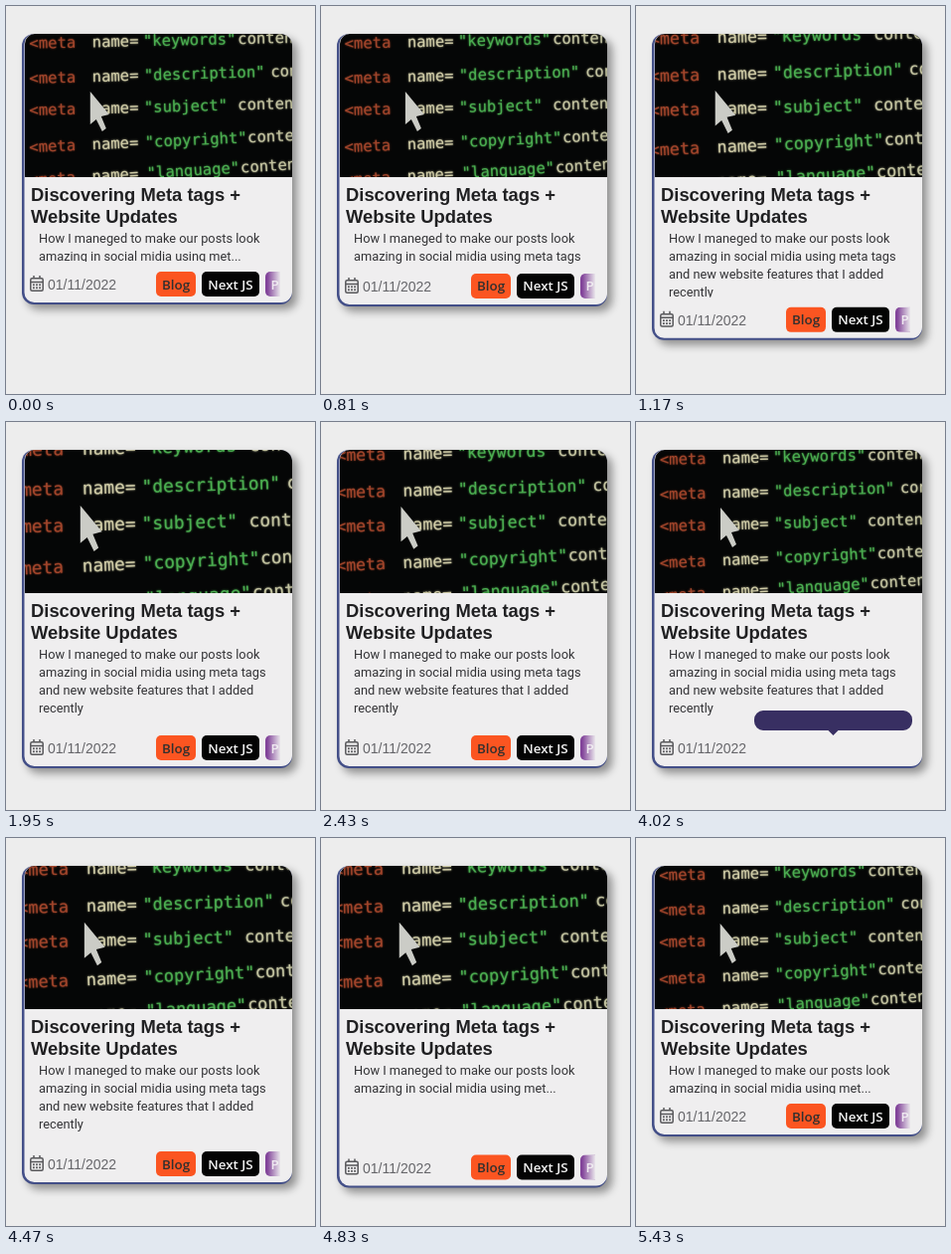
An HTML page with a canvas that plays this animation: 311x390 px, repeating every 5.46 s.

```html
<!DOCTYPE html>
<html lang="en">
<head>
<meta charset="utf-8">
<title>Post card</title>
<style>
  html, body { margin: 0; width: 100%; height: 100%; overflow: hidden; background: #ededed; }
  canvas { display: block; width: 311px; height: 390px; }
</style>
</head>
<body>
<canvas id="stage"></canvas>
<script>
const W = 311, H = 390, LOOP = 5460;
const canvas = document.getElementById('stage');
const ctx = canvas.getContext('2d');
const dpr = window.devicePixelRatio || 1;
canvas.width = W * dpr;
canvas.height = H * dpr;

const SANS = '"Liberation Sans", Arial, sans-serif';
const BODY = '12.8px Roboto, sans-serif';
const TAG = '600 13.4px "Open Sans", sans-serif';
const MONO = '15.5px "DejaVu Sans Mono", monospace';

// Pointer enters the card, moves to the tags, returns, then leaves.
const ENTER = 780, TAGS_IN = 2010, TIP_OPEN = 2430, TAGS_OUT = 4020, LEAVE = 4655;
const ZOOM_TIME = 1300, ZOOM = 0.15;

const SHORT_TEXT = ['How I maneged to make our posts look', 'amazing in social midia using met...'];
const FULL_TEXT = ['How I maneged to make our posts look', 'amazing in social midia using meta tags',
  'and new website features that I added', 'recently'];

const tags = {
  blog: { text: 'Blog', w: 40, fill: '#fb5521', ink: '#30302f' },
  next: { text: 'Next JS', w: 58, fill: '#040404', ink: '#f4f4f4' },
  prog: { text: 'Programming', w: 99, fill: '#82449a', ink: '#f1e8f4' },
  design: { text: 'Design', w: 55, fill: '#82b834', ink: '#20241a' }
};

const codeLines = [
  { y: 43, tilt: -0.022, word: 'keywords', wordX: 138, tailX: 233, tail: 'content' },
  { y: 78, tilt: -0.028, word: 'description', wordX: 139, tailX: 266, tail: 'content' },
  { y: 110, tilt: -0.026, word: 'subject', wordX: 139, tailX: 233, tail: 'content' },
  { y: 147, tilt: -0.045, word: 'copyright', wordX: 140, tailX: 243, tail: 'content' },
  { y: 180, tilt: -0.06, word: 'language', wordX: 142, tailX: 236, tail: 'content' }
];

const clamp = v => Math.max(0, Math.min(1, v));
const progress = (t, from, time) => clamp((t - from) / time);

// Standard CSS "ease": cubic-bezier(.25, .1, .25, 1)
function ease(x) {
  if (x <= 0 || x >= 1) return clamp(x);
  const curve = (a, b, u) => 3 * a * u * (1 - u) ** 2 + 3 * b * u * u * (1 - u) + u ** 3;
  let lo = 0, hi = 1;
  for (let i = 0; i < 20; i++) {
    const mid = (lo + hi) / 2;
    if (curve(0.25, 0.25, mid) < x) lo = mid; else hi = mid;
  }
  return curve(0.1, 1, lo);
}

function zoomAt(t) {
  if (t < ENTER) t += LOOP;
  const rise = (from, at) => ease(progress(at, from, ZOOM_TIME));
  const fall = (peak, from, time) => peak * (1 - ease(progress(t, from, time)));
  let z;
  if (t < TAGS_IN) z = rise(ENTER, t);
  else if (t < TAGS_OUT) z = fall(rise(ENTER, TAGS_IN), TAGS_IN, ZOOM_TIME);
  else if (t < LEAVE) z = rise(TAGS_OUT, t);
  else {
    const peak = rise(TAGS_OUT, LEAVE);
    z = fall(peak, LEAVE, ZOOM_TIME * peak);
  }
  return 1 + ZOOM * z;
}

function cardBottom(t) {
  if (t < LEAVE) return 300 + 48 * progress(t, 790, 510);
  return 352 - 52 * ease(progress(t, 4820, 590));
}

function box(x, y, w, h, r, fill) {
  ctx.beginPath();
  ctx.roundRect(x, y, w, h, r);
  ctx.fillStyle = fill;
  ctx.fill();
}

function label(text, x, y, font, fill) {
  ctx.font = font;
  ctx.fillStyle = fill;
  ctx.fillText(text, x, y);
}

function clipped(x, y, w, h, r, draw) {
  ctx.save();
  ctx.beginPath();
  ctx.roundRect(x, y, w, h, r);
  ctx.clip();
  draw();
  ctx.restore();
}

function drawTag(tag, x, y) {
  box(x, y, tag.w, 25, 5, tag.fill);
  ctx.textAlign = 'center';
  label(tag.text, x + tag.w / 2, y + 17.5, TAG, tag.ink);
  ctx.textAlign = 'left';
}

function drawCode({ y, tilt, word, wordX, tailX, tail }) {
  const part = (text, x, color) => {
    ctx.save();
    ctx.translate(x, y + (x - 24) * tilt);
    ctx.rotate(tilt);
    ctx.shadowColor = color;
    ctx.shadowBlur = 2 * dpr;
    label(text, 0, 0, MONO, color);
    ctx.restore();
  };
  part('<meta', 24, '#a1452b');
  part('name=', 87, '#cfcba6');
  part(`"${word}"`, wordX, '#4bad50');
  part(tail, tailX, '#c3c3a0');
}

function drawPointer() {
  ctx.beginPath();
  [[85, 86], [85, 119], [91, 114], [97, 126], [101, 123], [96, 111], [104, 109]]
    .forEach(([x, y]) => ctx.lineTo(x, y));
  ctx.closePath();
  ctx.fillStyle = '#cbccc6';
  ctx.fill();
}

function drawPhoto(zoom) {
  clipped(19, 28, 269, 144, [10, 12, 0, 0], () => {
    ctx.fillStyle = '#050606';
    ctx.fillRect(19, 28, 269, 144);
    ctx.translate(153.5, 100);
    ctx.scale(zoom, zoom);
    ctx.translate(-153.5, -100);
    codeLines.forEach(drawCode);
    drawPointer();
  });
}

function drawCalendar(x, y) {
  ctx.strokeStyle = '#58585b';
  ctx.fillStyle = '#58585b';
  ctx.lineWidth = 1.5;
  ctx.beginPath();
  ctx.roundRect(x + 0.8, y + 2.8, 12.4, 12.4, 1.5);
  ctx.moveTo(x + 1, y + 6.5);
  ctx.lineTo(x + 13, y + 6.5);
  ctx.moveTo(x + 4, y);
  ctx.lineTo(x + 4, y + 3);
  ctx.moveTo(x + 10, y);
  ctx.lineTo(x + 10, y + 3);
  ctx.stroke();
  for (let row = 0; row < 2; row++)
    for (let col = 0; col < 3; col++)
      ctx.fillRect(x + 3 + col * 3.1, y + 8.4 + row * 3, 1.8, 1.8);
}

function drawTagRow(y, alpha) {
  if (alpha <= 0) return;
  ctx.save();
  ctx.globalAlpha = alpha;
  drawTag(tags.blog, 151, y);
  drawTag(tags.next, 197, y);
  clipped(261, y, 15, 25, 0, () => {
    drawTag(tags.prog, 261, y);
    const fade = ctx.createLinearGradient(263, 0, 276, 0);
    fade.addColorStop(0, 'rgba(239,238,239,0)');
    fade.addColorStop(1, 'rgba(239,238,239,.95)');
    ctx.fillStyle = fade;
    ctx.fillRect(261, y, 16, 25);
  });
  ctx.restore();
}

function drawTooltip(t) {
  const open = t < TAGS_OUT;
  const alpha = open ? ease(progress(t, TIP_OPEN, 270)) : 1 - ease(progress(t, TAGS_OUT + 20, 300));
  if (alpha <= 0) return;
  const width = open ? 155 : 159, top = open ? 198 : 290;
  const center = 119 + width / 2;
  ctx.save();
  ctx.globalAlpha = alpha;
  ctx.beginPath();
  ctx.roundRect(119, top, width, 310 - top, open ? 8 : 9);
  ctx.moveTo(center - 5, 310);
  ctx.lineTo(center + 5, 310);
  ctx.lineTo(center, 315);
  ctx.closePath();
  ctx.fillStyle = '#382f62';
  ctx.fill();
  if (open) {
    drawTag(tags.blog, 144, 210);
    drawTag(tags.next, 191, 210);
    drawTag(tags.prog, 147, 242);
    drawTag(tags.design, 169, 274);
  }
  ctx.restore();
}

function drawCard(bottom) {
  ctx.save();
  ctx.shadowColor = 'rgba(0,0,0,.4)';
  ctx.shadowBlur = 8 * dpr;
  ctx.shadowOffsetX = ctx.shadowOffsetY = 5 * dpr;
  box(16, 28, 272, bottom - 28, 12, '#434f88');
  ctx.restore();
  box(18.5, 28, 269.5, bottom - 30, [10, 12, 11, 10], '#efeeef');
}

function render(t) {
  const bottom = cardBottom(t);
  const expanded = t >= ENTER && t < LEAVE;
  const rowAlpha = t < TAGS_OUT
    ? 1 - ease(progress(t, TIP_OPEN + 30, 240))
    : ease(progress(t, TAGS_OUT + 30, 270));

  ctx.setTransform(dpr, 0, 0, dpr, 0, 0);
  ctx.fillStyle = '#ededed';
  ctx.fillRect(0, 0, W, H);
  drawCard(bottom);
  drawPhoto(zoomAt(t));

  const titleFont = `bold 18.4px ${SANS}`;
  label('Discovering Meta tags +', 25, 196, titleFont, '#202022');
  label('Website Updates', 25, 218, titleFont, '#202022');

  clipped(25, 222, 255, bottom - 43 - 222, 0, () => {
    const lines = expanded ? FULL_TEXT : SHORT_TEXT;
    lines.forEach((line, i) => label(line, 33, 238 + 18 * i, BODY, '#333336'));
  });

  drawCalendar(24, bottom - 29);
  label('01/11/2022', 42, bottom - 15, `14px ${SANS}`, '#66666a');
  drawTagRow(bottom - 33, rowAlpha);
  drawTooltip(t);
}

const start = performance.now();
function tick() {
  render((performance.now() - start) % LOOP);
  requestAnimationFrame(tick);
}
tick();
</script>
</body>
</html>
```
